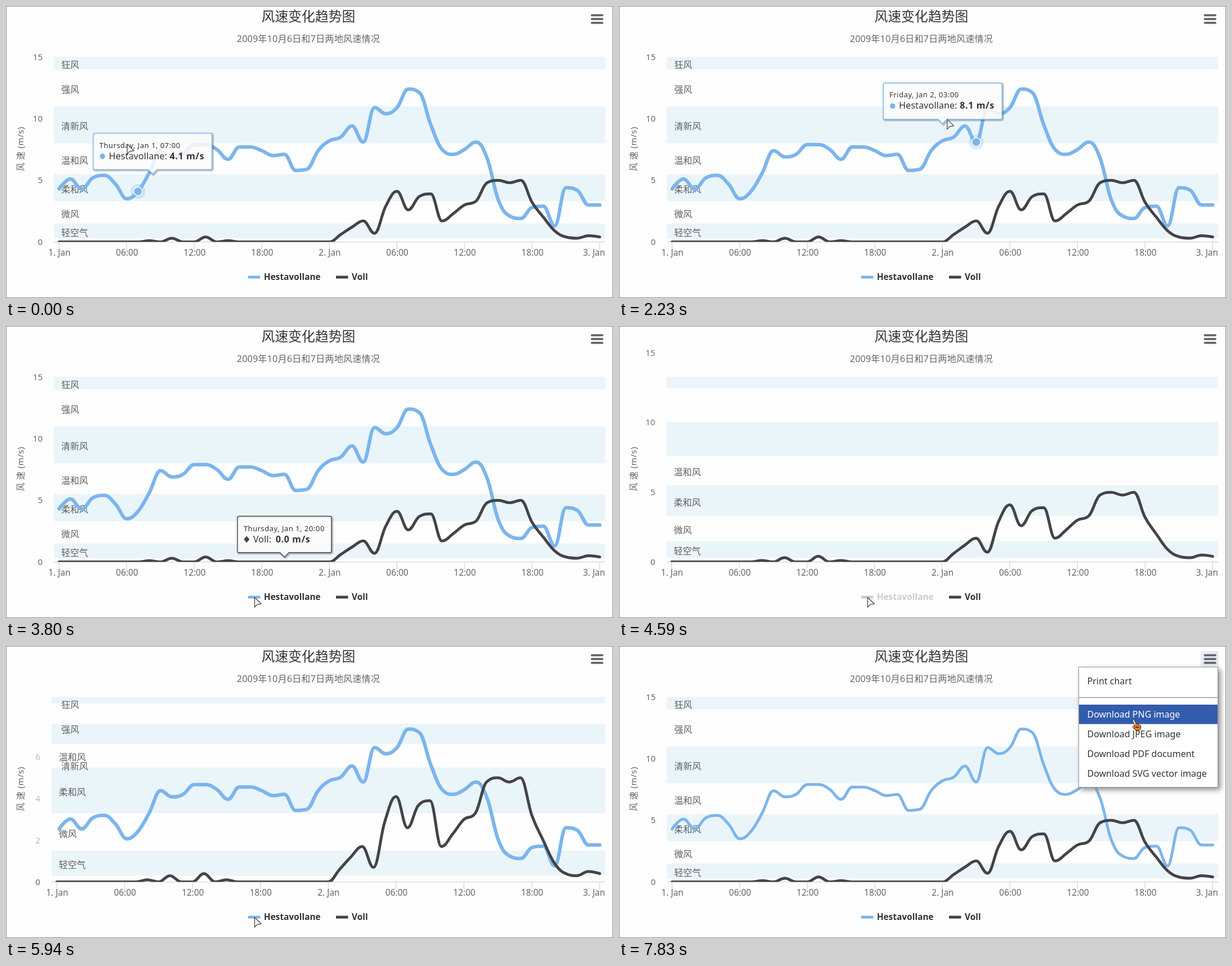
Animation, 1078 px wide and 518 px high, one loop 8000 ms. Source, as an HTML page:

```html
<!DOCTYPE html>
<html lang="zh">
<head>
<meta charset="utf-8">
<style>
html, body { margin: 0; height: 100%; overflow: hidden; background: #fefefe; }
svg { display: block; font-family: "Noto Sans", "Noto Sans CJK SC", "Noto Sans CJK", sans-serif; }
text { white-space: pre; }
</style>
</head>
<body>
<svg id="stage" width="1078" height="518" viewBox="0 0 1078 518"></svg>
<script>
const LOOP = 8000, TOP = 90.5, HEIGHT = 328, BASE = TOP + HEIGHT, RIGHT = 1064;
const CALM = 15, LOW = 6;          // axis maximum with both lines, and with one
const stage = document.getElementById('stage');

// Hourly wind speeds
const series = [
  { name: 'Hestavollane', color: '#7cb5ec', width: 211, valueX: 136, data: [
    4.3, 5.1, 4.3, 5.2, 5.4, 4.7, 3.5, 4.1, 5.6, 7.4, 6.9, 7.1, 7.9, 7.9, 7.5, 6.7, 7.7,
    7.7, 7.4, 7, 7.1, 5.8, 5.9, 7.4, 8.2, 8.5, 9.4, 8.1, 10.9, 10.4, 10.9, 12.4, 12.1,
    9.5, 7.5, 7.1, 7.5, 8.1, 6.8, 3.4, 2.1, 1.9, 2.8, 2.9, 1.3, 4.4, 4.2, 3, 3] },
  { name: 'Voll', color: '#434348', width: 147, valueX: 68, data: [
    ...Array(8).fill(0), .1, 0, .3, 0, 0, .4, 0, .1, ...Array(9).fill(0),
    .6, 1.2, 1.7, .7, 2.9, 4.1, 2.6, 3.7, 3.9, 1.7, 2.3, 3, 3.3, 4.8, 5, 4.8, 5,
    3.2, 2, .9, .4, .3, .5, .4] }
];

const limits = [.3, 1.5, 3.3, 5.5, 8, 11, 14, 15];
const bands = '轻空气 微风 柔和风 温和风 清新风 强风 狂风'.split(' ')
  .map((name, i) => ({ name, from: limits[i], to: limits[i + 1], shaded: i % 2 === 0 }));

// Turning points of the pointer: time, x, y
const pointer = [
  [0, 215, 245], [510, 110, 100], [900, 130, 170], [1320, 222, 342], [1440, 241, 331],
  [1680, 315, 250], [2350, 640, 190], [2740, 650, 360], [2990, 596, 396], [3680, 441, 481],
  [6380, 441, 481], [6750, 1053, 13], [7400, 1053, 13], [7690, 912, 130]
];
// Turning points of the hovered hour: time, hour
const hours = [
  [-130, 8.3], [760, .5], [1050, 4], [1310, 6.07], [1380, 7], [1440, 7.45], [2220, 27],
  [2450, 28], [2860, 26.6], [2990, 26.4], [3380, 20], [6400, 20], [6480, 45.8]
];

const mix = (a, b, f) => a + (b - a) * f;
const clamp = (v, a, b) => Math.max(a, Math.min(b, v));
const ramp = (t, from, span) => clamp((t - from) / span, 0, 1);
const ease = f => .5 - .5 * Math.cos(Math.PI * f);

function sample(keys, t) {
  const i = Math.max(0, keys.findLastIndex(k => k[0] <= t)), a = keys[i], b = keys[i + 1] || a;
  return a.map((v, j) => mix(v, b[j], ramp(t, a[0], b[0] - a[0] || 1)));
}
const hourAt = t => sample(hours, t)[1];
const valueAt = (data, u) => mix(data[Math.floor(u)], data[Math.ceil(u)], u % 1);
const clock = i => String(i % 24).padStart(2, '0') + ':00';

const text = (s, x, y, size, fill, extra = '') =>
  `<text x="${x}" y="${y}" font-size="${size}" fill="${fill}" ${extra}>${s}</text>`;
const rect = (x, y, w, h, fill, extra = '') =>
  `<rect x="${x}" y="${y}" width="${w}" height="${h}" fill="${fill}" ${extra}/>`;
const path = (d, stroke, width, extra = '') =>
  `<path d="${d}" stroke="${stroke}" stroke-width="${width}" fill="none" ${extra}/>`;
const MIDDLE = 'text-anchor="middle" ', BOLD = 'font-weight="700" ';

// Smooth curve that never overshoots its neighbours
function spline(pts) {
  let d = 'M' + pts[0], [outX, outY] = pts[0];
  for (let i = 1; i < pts.length; i++) {
    const [x, y] = pts[i], [px, py] = pts[i - 1], next = pts[i + 1];
    let lx = x, ly = y, rx = x, ry = y;
    if (next) {
      const [nx, ny] = next;
      lx = (1.5 * x + px) / 2.5; ly = (1.5 * y + py) / 2.5;
      rx = (1.5 * x + nx) / 2.5; ry = (1.5 * y + ny) / 2.5;
      const shift = (ry - ly) * (rx - x) / (rx - lx) + y - ry;
      ly += shift; ry += shift;
      const inL = clamp(ly, Math.min(py, y), Math.max(py, y));
      if (inL !== ly) { ly = inL; ry = 2 * y - ly; }
      const inR = clamp(ry, Math.min(ny, y), Math.max(ny, y));
      if (inR !== ry) { ry = inR; ly = 2 * y - ry; }
    }
    d += `C${outX} ${outY} ${lx} ${ly} ${x} ${y}`;
    outX = rx; outY = ry;
  }
  return d;
}

const fullX = i => 94.4 + 20 * i;
const fullY = v => BASE - v * HEIGHT / CALM;

// The box trails the hovered point, sideways more slowly than up and down
function drawTip(n, t) {
  const { name, color, width, valueX, data } = series[n];
  const i = Math.round(hourAt(t));
  const ax = fullX(hourAt(t - 130)), ay = fullY(valueAt(data, hourAt(t - 60)));
  const w = Math.max(width, i < 24 ? 167 : 0);
  const x = clamp(ax - w / 2, 1, 1076.5 - w), y = ay - 81, b = y + 64.5, r = x + w;
  const box = `M${x + 3} ${y}H${r - 3}q3 0 3 3V${b - 3}q0 3-3 3H${ax + 8}l-8 8l-8-8H${x + 3}q-3 0-3-3V${y + 3}q0-3 3-3z`;
  const day = i < 24 ? 'Thursday, Jan 1, ' : 'Friday, Jan 2, ';
  const dot = n
    ? `<path d="M${x + 16.5} ${y + 35}l5 6l-5 6l-5-6z" fill="${color}"/>`
    : `<circle cx="${x + 16.5}" cy="${y + 41}" r="4.8" fill="${color}"/>`;
  return [5, 3, 1.5].map(s => path(box, '#000', s, 'opacity=".1" transform="translate(1.5 1.5)"')).join('') +
    path(box, color, 1.4, 'style="fill:rgba(252,252,252,.87)"') + dot +
    text(day + clock(i), x + 11, y + 26, 13, '#333', 'letter-spacing=".5"') +
    text(name + ':', x + 28, y + 46, 16, '#333', 'letter-spacing=".15"') +
    text(data[i].toFixed(1) + ' m/s', x + valueX, y + 46, 16, '#333', BOLD + 'letter-spacing=".6"');
}

function drawMarker(n, t) {
  const { color, data } = series[n], i = Math.round(hourAt(t)), x = fullX(i), y = fullY(data[i]);
  return `<circle cx="${x}" cy="${y}" r="13" fill="${color}" opacity=".28"/>` + (n
    ? `<path d="M${x} ${y - 8}l8 8l-8 8l-8-8z" fill="${color}" stroke="#fff" stroke-width="1.25"/>`
    : `<circle cx="${x}" cy="${y}" r="7.7" fill="${color}" stroke="#fff" stroke-width="1.5"/>`);
}

function drawMenu(t) {
  const items = ['Print chart', 'Download PNG image', 'Download JPEG image', 'Download PDF document', 'Download SVG vector image'];
  const glow = [t < 7650 ? ramp(t, 7400, 200) : 0, ramp(t, 7650, 170)];
  return rect(816.5, 37.5, 247, 213, '#fff', 'stroke="#999" style="filter:drop-shadow(4px 4px 5px #888)"') +
    path('M817 91.5H1063', '#999', 1.5) +
    items.map((s, i) => {
      const y = i ? 69 + 35 * i : 45, on = glow[i] || 0;
      return rect(817, y, 246, 34.5, '#335cad', `opacity="${on}"`) +
        text(s, 831.5, y + 23, 16, on > .5 ? '#fff' : '#333');
    }).join('');
}

function drawPointer(t) {
  const [, x, y] = sample(pointer, t);
  const hand = 'M0 1q2-2 3 1l3 6q2-1 3 1q2-1 3 1q3 0 3 4l-1 5l-7 2l-7-7q-1-2 2-2l2 1z';
  return `<g transform="translate(${x} ${y})" stroke-linejoin="round">` + (t >= 7450
    ? `<path d="${hand}" fill="#fff" stroke="#333"/><circle cx="8" cy="14" r="5.5" fill="#f08020" stroke="#743c10"/>` +
      path('M5 14h6', '#5a2a08', 2)
    : '<path d="M.5 .5V18L5 13.2L12.5 12z" fill="#f4f4f4" stroke="#444" stroke-width="1.2"/>') + '</g>';
}

function render(t) {
  // Legend click hides the first line, a second click brings it back
  const hidden = t >= 4496 && t < 5678, back = t >= 5678;
  const p = ease(ramp(t, back ? 5678 : 4496, 500));
  const zoom = back ? 1 - p : p;
  const left = 85 - 9 * zoom, scale = HEIGHT * mix(1 / CALM, 1 / LOW, zoom);
  const px = i => left + (9.4 + 20 * i) * (RIGHT - left) / 979;
  const py = v => BASE - v * scale;
  const bandY = v => mix(fullY(v), BASE - Math.min(v, LOW) * HEIGHT / LOW, zoom);

  const late = t >= 6560;
  const tipOf = t < 2480 || late && t < 7190 ? 0 : t < 3920 ? 1 : -1;
  const hovered = t < 3500 || late && t < 6850 ? tipOf : -1;
  const onLegend = t >= 3680 && t < 6450;

  let out = rect(0, 0, 1078, 518, '#fefefe');
  for (const { from, to, shaded } of bands) if (shaded)
    out += rect(left, bandY(to), RIGHT - left, bandY(from) - bandY(to), '#eaf5fa');
  for (const { name, from, to } of bands) {
    const high = from > LOW;
    if (high && hidden) continue;
    const y = high ? fullY((from + to) / 2) : (bandY(from) + bandY(to)) / 2;
    out += text(name, high ? 98 : left + 13, y + 8.7, 16, '#606060');
  }

  // Axes
  const yLabel = (v, o) => text(v, left - 20, py(v) + 5, 15, '#666', `text-anchor="end" opacity="${o}"`);
  const fadeIn = ramp(p, .55, .45), fadeOut = 1 - p;
  out += yLabel(0, 1) +
    [5, 10, 15].map(v => yLabel(v, back ? fadeIn : fadeOut)).join('') +
    [2, 4, 6].map(v => yLabel(v, back ? fadeOut : fadeIn)).join('');
  out += path(`M${left} ${BASE}H${RIGHT}`, '#ccd6eb', 1.25);
  for (let i = 0; i <= 48; i += 6) {
    const x = px(i), s = i % 24 ? clock(i) : i / 24 + 1 + '. Jan';
    out += path(`M${x} 418V431`, '#ccd6eb', 1.25) +
      text(s, i < 48 ? x + .6 : RIGHT, 443, 15.4, '#666', i < 48 ? MIDDLE : 'text-anchor="end"');
  }
  out += text('风 速 (m/s)', 0, 0, 15, '#666', MIDDLE + 'letter-spacing=".6" transform="translate(31 253.5) rotate(-90)"');

  // Lines; the first one returns at its final place
  out += `<clipPath id="plot">${rect(left, TOP, RIGHT - left, HEIGHT, '#000')}</clipPath><g clip-path="url(#plot)">`;
  series.forEach(({ color, data }, n) => {
    if (!n && hidden) return;
    const pts = data.map((v, i) => n ? [px(i), py(v)] : [fullX(i), fullY(v)]);
    const thick = n === hovered || !n && onLegend;
    out += path(spline(pts), color, thick ? 6.25 : 5, 'stroke-linecap="round" stroke-linejoin="round"');
  });
  out += '</g>';
  if (hovered >= 0) out += drawMarker(hovered, t);

  // Headings and legend
  out += text('风速变化趋势图', 537, 27, 23.8, '#333', MIDDLE) +
    text('2009年10月6日和7日两地风速情况', 537, 63.5, 16, '#666', MIDDLE + 'letter-spacing=".25"');
  series.forEach(({ name, color }, n) => {
    const x = 430 + 156 * n, off = !n && hidden;
    out += path(`M${x} 481H${x + 21.5}`, off ? '#ccc' : color, 5) +
      text(name, x + 28, 486, 15.4, off ? '#ccc' : '#333', BOLD);
  });

  // Menu button
  if (t >= 6750) out += rect(1033, 9, 32, 28.5, t < 7190 ? '#e6e6e6' : '#e6ebf5', 'rx="3"');
  for (let i = 0; i < 3; i++)
    out += path(`M1040.5 ${16.3 + 6.8 * i}h18.5`, '#666', 3.75, 'stroke-linecap="round"');

  if (tipOf >= 0) out += drawTip(tipOf, t);
  if (t >= 7190) out += drawMenu(t);
  out += drawPointer(t) + rect(.5, .5, 1077, 517, 'none', 'stroke="#8c8c8c"');
  stage.innerHTML = out;
}

const start = performance.now();
function tick() {
  render((performance.now() - start) % LOOP);
  requestAnimationFrame(tick);
}
tick();
</script>
</body>
</html>
```
